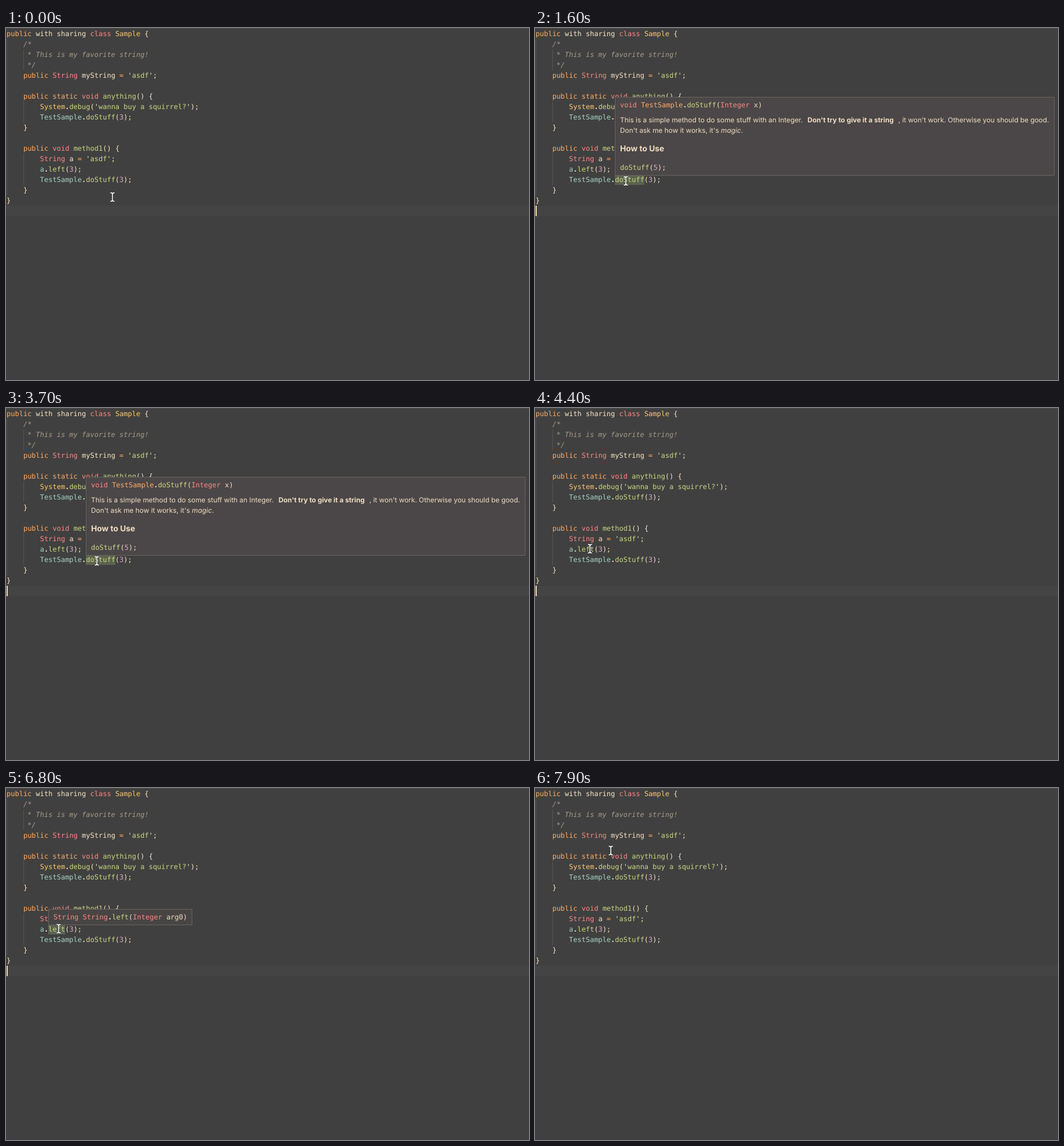
Animation of 904 by 608 pixels, one loop 8000 ms. Source, as an HTML page:

```html
<!DOCTYPE html>
<html lang="en">
<head>
<meta charset="utf-8">
<style>
  html, body { margin: 0; width: 100%; height: 100%; overflow: hidden; background: #404040; }
  body { position: relative; color: #f9e5c4; text-rendering: geometricPrecision; -webkit-font-smoothing: antialiased; }
  body *, pre { box-sizing: border-box; }
  body > *, .popup > * { position: absolute; margin: 0; white-space: pre; }
  pre { font: 12px/18px 'DejaVu Sans Mono', monospace; }
  .edge { left: 0; top: 0; width: 100%; height: 1px; background: #4c4c4c; }
  .line { left: 0; top: 307px; width: 100%; height: 18px; background: #444; }
  .guide { width: 1px; background: #565656; }
  .mark { height: 18px; background: #5b634f; }
  .popup { border: 1px solid #69645f; background: #4b4748; color: #f1dec1; font: 11.85px/18px Inter, sans-serif; }
  .popup h3 { font-size: 13.8px; line-height: 18px; }
  #callPopup { left: 138px; top: 119px; width: 760px; height: 136px; }
  #leftPopup { left: 73px; top: 209px; width: 249px; height: 28px; background: #474544; }
  #caret { left: 1px; top: 307px; width: 2px; height: 18px; background: #f1d9b0; }
  .comment { color: #a89b88; font-style: italic; }
  .text, .call { color: #cbd67f; }
  .keyword { color: #ffab62; }
  .type { color: #ff8783; }
  .name { color: #ffc76c; }
  .object { color: #a3d1c2; }
  .number { color: #dea6c3; }
  .dot { font-weight: bold; }
</style>
</head>
<body>
<div class="edge"></div>
<div class="line"></div>
<div class="guide" style="left:1px;top:19px;height:270px"></div>
<div class="guide" style="left:30px;top:37px;height:36px"></div>
<div class="guide" style="left:30px;top:127px;height:36px"></div>
<div class="guide" style="left:30px;top:217px;height:54px"></div>
<div class="mark" id="callMark" style="left:138px;top:253px;width:51px"></div>
<div class="mark" id="leftMark" style="left:73px;top:235px;width:29px"></div>
<pre style="left:1px;top:1px">public with sharing class Sample {
    /*
     * This is my favorite string!
     */
    public String myString = 'asdf';

    public static void anything() {
        System.debug('wanna buy a squirrel?');
        TestSample.doStuff(3);
    }

    public void method1() {
        String a = 'asdf';
        a.left(3);
        TestSample.doStuff(3);
    }
}</pre>
<div class="popup" id="callPopup">
  <pre class="signature" style="left:8px;top:4px">void TestSample.doStuff(Integer x)</pre>
  <span style="left:8px;top:30px">This is a simple method to do some stuff with an Integer.</span>
  <b style="left:332px;top:30px">Don't try to give it a string</b>
  <span style="left:489px;top:30px">, it won't work. Otherwise you should be good.</span>
  <span style="left:8px;top:48px">Don't ask me how it works, it's <i>magic</i>.</span>
  <h3 style="left:8px;top:80px">How to Use</h3>
  <pre style="left:8px;top:112px">doStuff(5);</pre>
</div>
<div class="popup" id="leftPopup">
  <pre style="left:8px;top:4px">String String.left(Integer arg0)</pre>
</div>
<div id="caret"></div>
<svg id="pointer" width="12" height="20" viewBox="-6 -10 12 20" style="left:-6px;top:-10px" fill="none">
  <path id="beam" d="M-3.5 -7.5Q0 -7.5 0 -5Q0 -7.5 3.5 -7.5M0 -5V5M-3.5 7.5Q0 7.5 0 5Q0 7.5 3.5 7.5" stroke="#333" stroke-width="2.6"/>
  <use href="#beam" id="core"/>
  <path d="M-3.5 -7.5Q0 -7.5 0 -5Q0 -7.5 3.5 -7.5M0 -5V5M-3.5 7.5Q0 7.5 0 5Q0 7.5 3.5 7.5" stroke="#fff" stroke-width="1.5"/>
</svg>
<script>
const LOOP = 8000, TICK = 100;
const byId = id => document.getElementById(id);
byId('core').remove();

const syntax = new RegExp([
  /(?<comment>\/\*[\s\S]*?\*\/)/,
  /(?<text>(?<=')[^'\n]+(?='))/,
  /(?<keyword>\b(?:public|static)\b|=)/,
  /(?<type>\b(?:class|void|String|Integer)\b)/,
  /(?<name>\b(?:Sample|System)\b)/,
  /(?<object>\bTestSample\b|\ba(?=\.))/,
  /(?<call>\w+(?=\())/,
  /(?<number>\b\d+\b)/,
  /(?<dot>\.)/
].map(rule => rule.source).join('|'), 'g');

for (const block of document.querySelectorAll('pre')) {
  block.innerHTML = block.textContent.replace(syntax, (token, ...rest) => {
    const groups = rest.at(-1);
    const kind = Object.keys(groups).find(key => groups[key] !== undefined);
    return `<span class="${kind}">${token}</span>`;
  });
}
document.querySelector('.signature .object').className = 'keyword';

// Pointer stops: time, x, y
const stops = [
  [0, 184, 292], [560, 157, 264], [4000, 157, 264], [4400, 95, 243],
  [4550, 91, 243], [7200, 91, 243], [7850, 131, 108], [LOOP, 131, 108]
];
const clamp = value => Math.min(1, Math.max(0, value));
const ease = p => p * p * (3 - 2 * p);

function pointerAt(t) {
  const next = stops.findIndex(stop => stop[0] > t);
  const [t0, x0, y0] = stops[next - 1], [t1, x1, y1] = stops[next];
  const p = ease((t - t0) / (t1 - t0));
  return [x0 + (x1 - x0) * p, y0 + (y1 - y0) * p];
}

function showHover(name, t, start, end) {
  const visible = t >= start && t < end;
  byId(name + 'Popup').style.opacity = visible ? clamp((t - start) / 100) : 0;
  byId(name + 'Mark').style.opacity = visible ? 1 : 0;
}

function draw(now) {
  const t = Math.floor(now % LOOP / TICK) * TICK;
  const [x, y] = pointerAt(t);
  byId('pointer').style.transform = `translate(${x}px, ${y}px)`;
  byId('caret').style.opacity = (t + 600) % 1000 < 500 ? 1 : 0;
  showHover('call', t, 870, 4200);
  showHover('left', t, 4870, 7500);
}

function frame() {
  draw(performance.now());
  requestAnimationFrame(frame);
}
frame();
</script>
</body>
</html>
```
